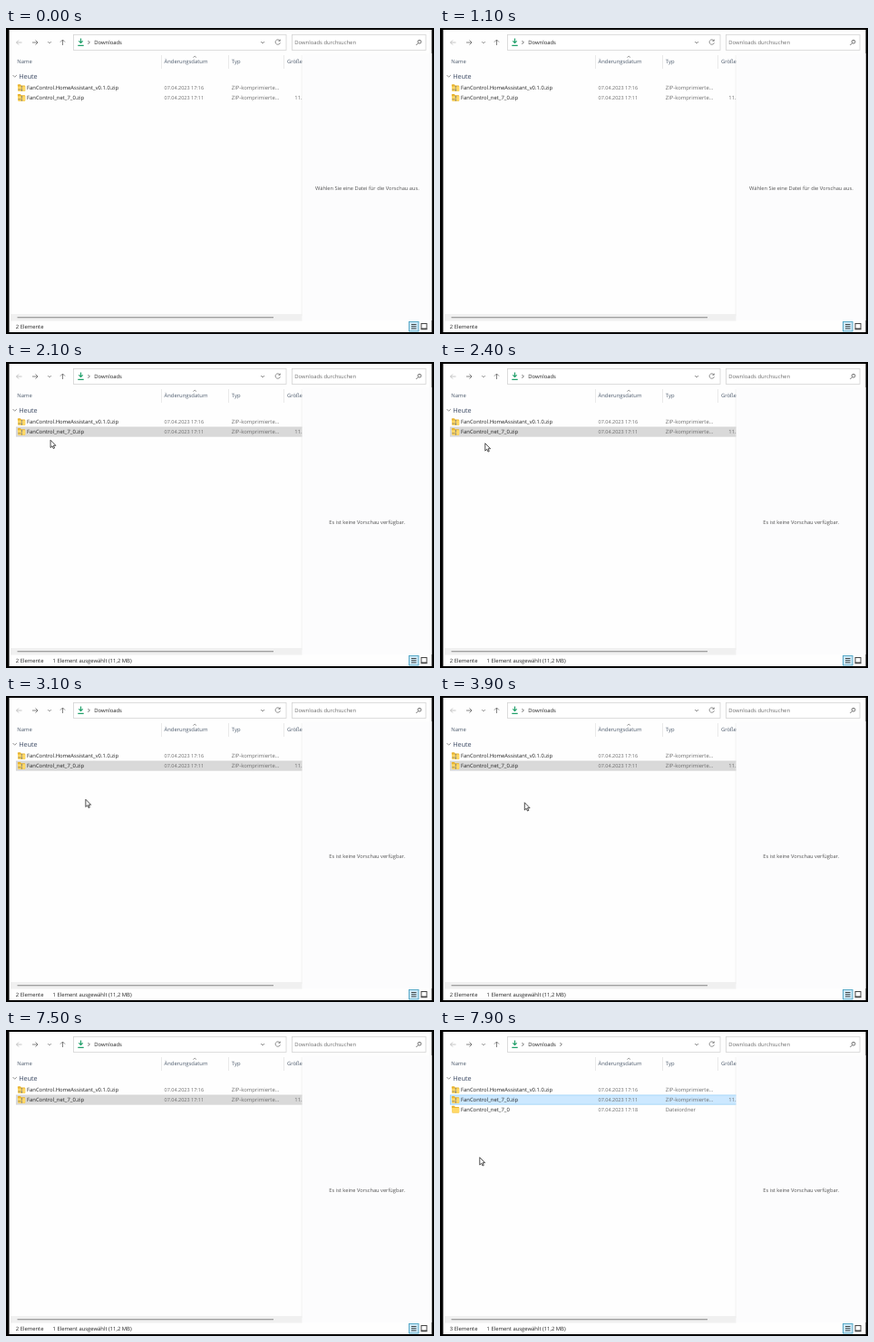
Write an HTML page that moves like this. It is 472x338 px and loops after 8 s.

```html
<!DOCTYPE html>
<html lang="de">
<head>
<meta charset="utf-8">
<title>Downloads</title>
<style>
html, body { margin: 0; width: 100%; height: 100%; overflow: hidden; background: #000; }
svg { display: block; width: 472px; height: 338px; }
text { font: 5.88px "Open Sans", "Noto Sans", sans-serif; fill: #222; text-rendering: geometricPrecision; }
.dim { fill: #6d6d6d; }
.head { fill: #4c5a6c; }
.date { font-size: 5.5px; }
.note { font-size: 5.7px; fill: #555; text-anchor: middle; }
.line { fill: none; stroke: #777; stroke-width: .8; }
.box { fill: #fff; stroke: #d4d4d4; stroke-width: .8; }
</style>
</head>
<body>
<svg viewBox="0 0 472 338">
  <defs>
    <clipPath id="list"><rect x="4" y="28" width="322.5" height="290"/></clipPath>
    <g id="folder">
      <path d="M0 .8Q0 0 .8 0H3l1 1.2h3.6q.8 0 .8.8v5q0 .8-.8.8H.8Q0 7.800 7z" fill="#e8b32f"/>
      <path d="M0 2.300h8.400V7q0 .8-.8.8H.8Q0 7.800 7z" fill="#ffd866"/>
    </g>
    <g id="zip">
      <use href="#folder"/>
      <path d="M4.600 2v5.800" stroke="#6f7780" stroke-width="1.300" stroke-dasharray=".8 .5"/>
      <path d="M.5 5.800h3" stroke="#8a7a4a" stroke-width=".8"/>
    </g>
  </defs>

  <rect x="3.500" y="2" width="466" height="334" fill="#fefefe"/>
  <rect x="327" y="28" width="142.500" height="295" fill="#fcfcfd"/>

  <!-- toolbar -->
  <g class="line">
    <path d="M17.500 16H11.500m2.500-2.500L11.500 16l2.500 2.500" stroke="#b5b5b5"/>
    <path d="M29 16h6m-2.500-2.500L35 16l-2.500 2.500" stroke="#666"/>
    <path d="M46 15l2 2 2-2" stroke="#888"/>
    <path d="M62.500 19v-6m-2.500 2.500l2.500-2.500 2.500 2.500" stroke="#666"/>
  </g>
  <rect class="box" x="74.500" y="7.500" width="234.500" height="17"/>
  <rect class="box" x="315.500" y="7.500" width="147.500" height="17"/>
  <path d="M82.500 11.500v5m-2.200-2.200l2.200 2.200 2.200-2.200M79.300 19.300h6.400" fill="none" stroke="#22a06b" stroke-width="1.200"/>
  <g class="line">
    <path d="M90.500 14l1.800 1.900-1.800 1.900" stroke="#444"/>
    <path id="crumb" d="M132.500 14l1.800 1.900-1.800 1.900" stroke="#444"/>
    <path d="M281 15l2 2 2-2"/>
    <path d="M302 14a2.700 2.700 0 1 0 .4 2.200M302.300 12.600v1.800h-1.800"/>
    <circle cx="456" cy="15.200" r="1.900" stroke="#555"/>
    <path d="M454.600 16.700l-2.300 2.300" stroke="#555"/>
  </g>
  <text x="97.300" y="18">Downloads</text>
  <text x="318.300" y="18" class="dim">Downloads durchsuchen</text>

  <!-- file list -->
  <g clip-path="url(#list)">
    <path d="M171.500 30v15M245.500 30v15M306.500 30v15M326.300 30v288" stroke="#e5e5e5" stroke-width=".8"/>
    <path class="line" d="M206.500 32.500l1.700-1.300 1.700 1.300" stroke-width=".6"/>
    <text x="12.300" y="39.200" class="head">Name</text>
    <text x="174.500" y="39.200" class="head">Änderungsdatum</text>
    <text x="248.800" y="39.200" class="head">Typ</text>
    <text x="310" y="39.200" class="head">Größe</text>
    <path class="line" d="M7.500 52l2.200 2.200 2.200-2.200"/>
    <text x="14.300" y="55.600" style="font-size:7.200px;fill:#3c4a64">Heute</text>
    <g id="rows"></g>
  </g>
  <rect x="5" y="316" width="321.500" height="7.500" fill="#f0f0f0"/>
  <path d="M12.500 319.800H295" stroke="#858585" stroke-width="1.100"/>

  <text id="preview" class="note" x="398.400" y="179.300"></text>

  <!-- status bar -->
  <text id="count" x="10.800" y="332"></text>
  <text id="chosen" x="51.500" y="332">1 Element ausgewählt (11,2 MB)</text>
  <rect x="444.500" y="324.500" width="10.500" height="10.500" fill="#cce8f6" stroke="#4aa3c4" stroke-width=".9"/>
  <path d="M447 327.500h5.500M447 329.700h5.500M447 331.900h5.500" stroke="#333" stroke-width=".9"/>
  <rect x="458" y="326.500" width="6" height="5.500" fill="#fff" stroke="#333" stroke-width=".9"/>
  <path d="M457.500 332.700h7" stroke="#333" stroke-width="1.100"/>

  <path id="cursor" d="M0 0V8.300L1.900 6.500 3.200 9.300 4.500 8.700 3.200 6H5.800Z" fill="#fff" stroke="#222" stroke-width=".8" stroke-linejoin="round"/>
</svg>
<script>
const LOOP = 8000;
const HOVER_FIRST = 1200, HOVER_SECOND = 1600, SELECT = 1900, BLUR = 2100, EXTRACTED = 7700;
const $ = id => document.getElementById(id);

const files = [
  ["zip", "FanControl.HomeAssistant_v0.1.0.zip", "07.04.2023 17:16", "ZIP-komprimierte...", ""],
  ["zip", "FanControl_net_7_0.zip", "07.04.2023 17:11", "ZIP-komprimierte...", "11.539 KB"],
  ["folder", "FanControl_net_7_0", "07.04.2023 17:18", "Dateiordner", ""]
];
$("rows").innerHTML = files.map(([icon, name, date, type, size], i) => `
  <g id="row${i}" transform="translate(0 ${60.9 + 10.75 * i})">
    <rect x="11.3" y=".3" width="318" height="10.2" stroke-width=".7"/>
    <use href="#${icon}" x="12.8" y="1.3"/>
    <text x="23" y="7.3">${name}</text>
    <text x="174.500" y="7.3" class="dim date">${date}</text>
    <text x="248.800" y="7.3" class="dim">${type}</text>
    <text x="318.300" y="7.3" class="dim">${size}</text>
  </g>`).join("");

const looks = {
  none: ["none", "none"],
  hover: ["#e5f3fd", "#e5f3fd"],
  active: ["#cce8ff", "#8fcbf5"],
  idle: ["#d9d9d9", "#cfcfcf"]
};

// Pointer keys: time, x, y; the pointer is hidden between its visits
const visits = [
  [[1900, 47, 76], [2200, 49.8, 89.8], [2400, 49.8, 89.8], [3300, 93.3, 117.7], [4500, 93.3, 117.7]],
  [[7700, 46, 134], [7850, 43.8, 140.7], [LOOP, 43.8, 140.7]]
];

function pointerAt(t) {
  const keys = visits.find(v => t >= v[0][0] && t < v.at(-1)[0]);
  if (!keys) return null;
  const i = keys.findIndex(k => k[0] > t);
  const [t0, x0, y0] = keys[i - 1], [t1, x1, y1] = keys[i];
  const p = (t - t0) / (t1 - t0), e = p * p * (3 - 2 * p);
  return [x0 + (x1 - x0) * e, y0 + (y1 - y0) * e];
}

function paintRow(i, look) {
  const rect = $("row" + i).firstElementChild;
  rect.setAttribute("fill", looks[look][0]);
  rect.setAttribute("stroke", looks[look][1]);
}

const show = (id, on) => $(id).setAttribute("visibility", on ? "visible" : "hidden");

function draw(t) {
  const selected = t >= SELECT, done = t >= EXTRACTED;
  paintRow(0, t >= HOVER_FIRST && t < HOVER_SECOND ? "hover" : "none");
  paintRow(1, done ? "active" : t >= BLUR ? "idle" : selected ? "active" : t >= HOVER_SECOND ? "hover" : "none");
  paintRow(2, "none");
  show("row2", done);
  show("crumb", done);
  show("chosen", selected);
  $("count").textContent = (done ? 3 : 2) + " Elemente";
  $("preview").textContent = selected ? "Es ist keine Vorschau verfügbar." : "Wählen Sie eine Datei für die Vorschau aus.";
  const pos = pointerAt(t);
  show("cursor", pos);
  if (pos) $("cursor").setAttribute("transform", `translate(${pos})`);
}

const start = performance.now();
function tick() {
  draw((performance.now() - start) % LOOP);
  requestAnimationFrame(tick);
}
tick();
</script>
</body>
</html>
```
